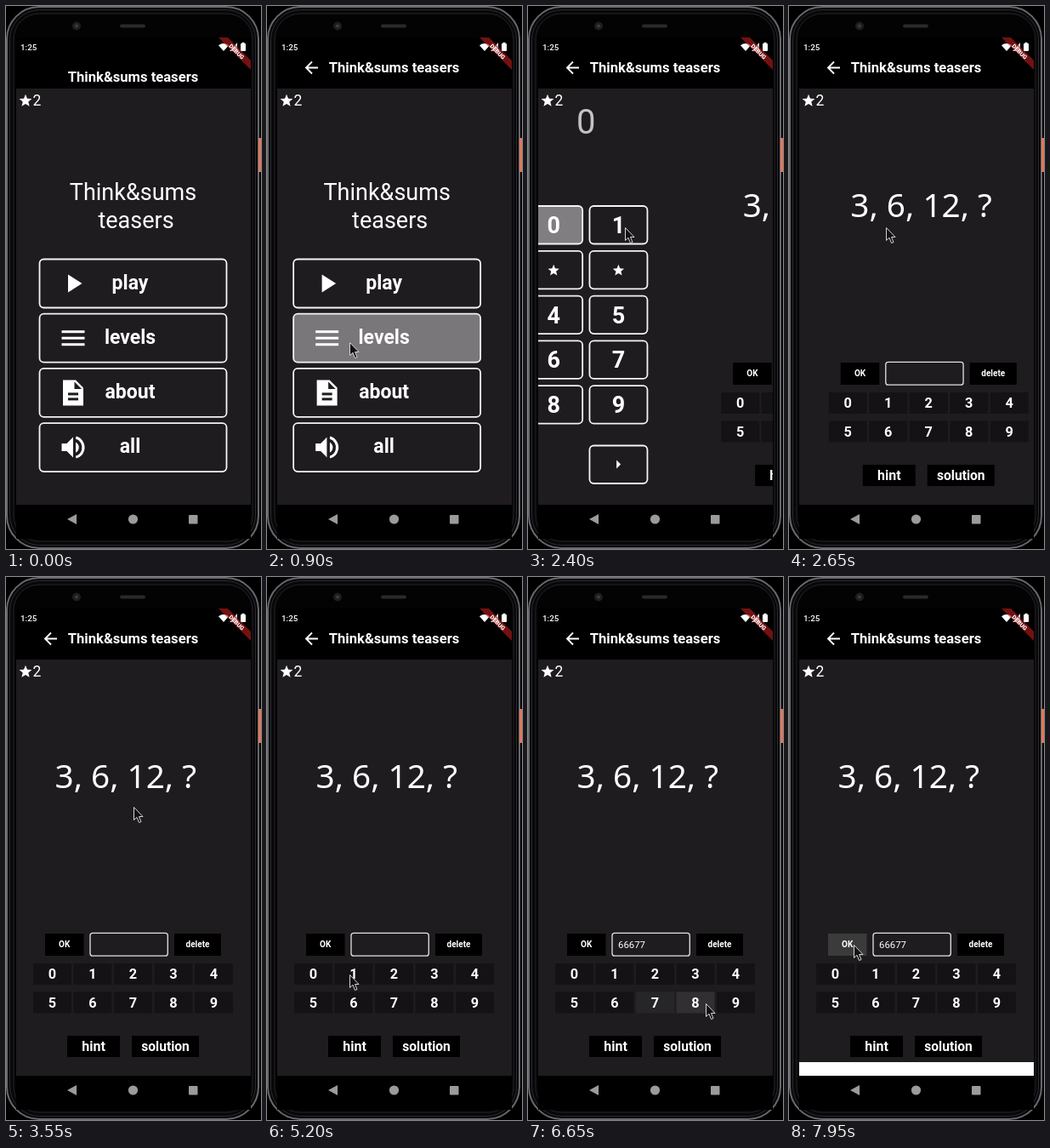
Recreate the animation shown at these times as an HTML page with a canvas. Size 300 by 638 pixels, loop 8000 ms.

```html
<!DOCTYPE html>
<html lang="en">
<head>
<meta charset="utf-8">
<title>Puzzle app</title>
<style>
html, body { margin: 0; height: 100%; overflow: hidden; background: #000; }
canvas { display: block; width: 100vw; height: 100vh; }
</style>
</head>
<body>
<canvas id="stage"></canvas>
<script>
const W = 300, H = 638, LOOP = 8000, STEP = 50, PAGE = 277;
const BG = '#1f1c1f', WHITE = '#fff', GRAY = '#9b9b9b';
const TYPED = '6667789', FIELD_SIZE = 5;
const canvas = document.getElementById('stage');
const dpr = window.devicePixelRatio || 1;
canvas.width = W * dpr;
canvas.height = H * dpr;
const c = canvas.getContext('2d');

// Timing
const clamp = v => Math.max(0, Math.min(1, v));
const ease = p => { p = clamp(p); return p * p * (3 - 2 * p); };
const pulse = (t, start, hold) =>
  t < start ? 0 : Math.min(1, 0.5 + (t - start) / 100) * (1 - clamp((t - start - hold) / 250));
const pressTime = i => 5600 + i * 190;

// Pointer stops: arrival time, travel time, place
const stop = (at, travel, x, y) => ({ at, travel, x, y });
const stops = [
  stop(50, 0, 239, 38), stop(280, 230, 30, 260), stop(450, 170, 97, 395),
  stop(2000, 750, 114, 260), stop(3550, 450, 150, 270), stop(3950, 400, 97, 467),
  stop(5400, 200, 97, 488), stop(6150, 200, 152, 495), stop(6650, 250, 209, 501),
  stop(6750, 100, 250, 502), stop(7450, 600, 76, 432)
];

// Drawing helpers
function text(s, x, y, size, weight = 700, align = 'center', color = WHITE, face = 'Roboto') {
  c.font = `${weight} ${size}px ${face}, sans-serif`;
  c.textAlign = align;
  c.fillStyle = color;
  c.fillText(s, x, y);
}
function rect(x, y, w, h, color = WHITE) {
  c.fillStyle = color;
  c.fillRect(x, y, w, h);
}
function round(x, y, w, h, r, fill, line = 0, color = WHITE) {
  c.beginPath();
  c.roundRect(x, y, w, h, r);
  if (fill) { c.fillStyle = fill; c.fill(); }
  if (line) { c.lineWidth = line; c.strokeStyle = color; c.stroke(); }
}
function poly(color, ...pts) {
  c.beginPath();
  for (let i = 0; i < pts.length; i += 2) c.lineTo(pts[i], pts[i + 1]);
  c.closePath();
  c.fillStyle = color;
  c.fill();
}
function disc(x, y, r, color, from = 0, to = 2 * Math.PI) {
  c.beginPath();
  c.arc(x, y, r, from, to);
  c.fillStyle = color;
  c.fill();
}
function star(x, y, r) {
  c.beginPath();
  for (let i = 0; i < 10; i++) {
    const a = i * Math.PI / 5, d = i % 2 ? r * 0.44 : r;
    c.lineTo(x + d * Math.sin(a), y - d * Math.cos(a));
  }
  c.fillStyle = WHITE;
  c.fill();
}
const triangle = (x, y, w, h, color = WHITE) => poly(color, x, y - h / 2, x + w, y, x, y + h / 2);
const veil = a => `rgba(255,255,255,${a})`;
const outlined = (x, y, w, h, glow = 0) => round(x, y, w, h, 5, veil(glow), 1.8, '#f4f4f4');

// Menu icons, drawn around their centre
const icons = {
  play() { triangle(-6, 0, 16.5, 21); },
  levels() { for (let y = -9; y <= 6; y += 7.5) rect(-13.5, y, 27, 3); },
  about() {
    poly(WHITE, -12, -15, 3, -15, 12, -6, 12, 15, -12, 15);
    poly(BG, 1.5, -13, 10, -4.5, 1.5, -4.5);
    rect(-6, 0, 12, 3, BG);
    rect(-6, 6, 12, 3, BG);
  },
  all() {
    poly(WHITE, -13.5, -4.5, -7.5, -4.5, 0, -12, 0, 12, -7.5, 4.5, -13.5, 4.5);
    disc(0, 0, 6.8, WHITE, -1.1, 1.1);
    c.beginPath();
    c.arc(0, 0, 12, -1.3, 1.3);
    c.lineWidth = 3;
    c.strokeStyle = WHITE;
    c.stroke();
    rect(0, -13, 3, 26, BG);
  }
};

function phone() {
  rect(0, 0, W, H, '#000');
  round(1, 1, 296, 636, 38, '#08070a', 2, '#68696d');
  round(4.5, 4.5, 289, 629, 35, '', 1, '#2b2b2f');
  round(9, 9, 281, 620, 30, '#030303', 1, '#242428');
  rect(297, 155, 3, 40, '#e0795c');
  disc(83, 23.5, 5, '#1d1e22');
  disc(83, 23.5, 2, '#3a3c42');
  round(134, 21.5, 30, 4, 2, '#2a2a2d');
}

function home(t) {
  text('Think&sums', 149.5, 228, 27, 400);
  text('teasers', 153, 260.5, 27, 400);
  Object.keys(icons).forEach((name, i) => {
    const y = 297.5 + i * 64.2;
    outlined(39.5, y, 220, 57, name === 'levels' ? 0.4 * pulse(t, 750, 200) : 0);
    c.save();
    c.translate(79, y + 28.5);
    icons[name]();
    c.restore();
    text(name, 146, y + 35, 23);
  });
}

function levels(t) {
  text('0', 150, 150, 40, 400, 'center', '#c4c2c4');
  for (let i = 0; i < 10; i++) {
    const x = 78 + (i % 2) * 76.3, y = 235 + (i >> 1) * 52.8;
    outlined(x, y, 68, 44.5, i ? 0 : 0.43 * pulse(t, 2200, 220));
    if (i === 2 || i === 3) star(x + 34, y + 23, 7);
    else text(i, x + 34, y + 32, 27);
  }
  outlined(154.3, 516.5, 68, 44.5);
  triangle(186, 538.5, 5, 10);
}

function button(label, x, y, w, h, size, glow = 0, color = '#000') {
  rect(x, y, w, h, color);
  rect(x, y, w, h, veil(glow));
  text(label, x + w / 2, y + h / 2 + size * 0.34, size);
}

function puzzle(t) {
  text('3, 6, 12, ?', 57.5, 248, 38.7, 500, 'left', WHITE, '"Noto Sans"');
  button('OK', 46, 419, 45.5, 26, 10, 0.23 * pulse(t, 7850, 400));
  button('delete', 198, 419, 55, 26, 10);
  round(99, 418.3, 91.3, 26.9, 3, '', 1.3, '#e4e4e4');
  const glow = {};
  [...TYPED].forEach((d, i) => { glow[d] = Math.max(glow[d] || 0, pulse(t, pressTime(i), 200)); });
  for (let i = 0; i < 10; i++)
    button(i, 32 + (i % 5) * 47.5, i < 5 ? 454 : 487.5, 45, 25, 16.3, 0.12 * (glow[i] || 0), '#141215');
  const count = clamp((Math.floor((t - pressTime(0)) / 190) + 1) / FIELD_SIZE) * FIELD_SIZE;
  text(TYPED.slice(0, count), 106, 435.7, 11.4, 400, 'left');
  button('hint', 72, 539, 62, 25, 16);
  button('solution', 148, 539, 79, 25, 15.6);
}

function statusBar() {
  text('1:25', 17, 52, 9.8, 500, 'left');
  disc(256, 52.5, 0.1, WHITE);
  c.beginPath();
  c.moveTo(256, 53);
  c.arc(256, 53, 9, -2.3, -0.84);
  c.fill();
  poly('#ddd', 263, 53, 272, 53, 272, 43);
  round(276, 44, 6, 9, 1, WHITE);
  rect(277.5, 42.8, 3, 2);
  poly('rgba(183,28,28,.63)', 250, 37, 261, 37, 288, 64, 288, 75);
  c.save();
  c.translate(271.3, 53.7);
  c.rotate(Math.PI / 4);
  text('DEBUG', 0, 2.4, 6.9, 900);
  c.restore();
}

function titleBar(inner) {
  rect(12, 37, 276, 60, '#000');
  statusBar();
  if (inner) {
    c.beginPath();
    c.moveTo(60, 72.5);
    c.lineTo(46, 72.5);
    c.moveTo(53, 65.5);
    c.lineTo(46, 72.5);
    c.lineTo(53, 79.5);
    c.lineWidth = 1.9;
    c.strokeStyle = WHITE;
    c.stroke();
  }
  text('Think&sums teasers', 149.5, inner ? 77.5 : 88.5, 16.6);
  star(23, 111.5, 7.8);
  text('2', 31.5, 117, 17.5, 400, 'left');
}

function nav() {
  rect(12, 586, 276, 40, '#000');
  triangle(83, 603, -11, 12, GRAY);
  disc(149.5, 603, 5.6, GRAY);
  round(215, 598, 10.5, 10.5, 1, GRAY);
}

function pointer(t) {
  if (t < stops[0].at) return;
  let { x, y } = stops[0];
  for (const s of stops.slice(1)) {
    const p = clamp((t - s.at + s.travel) / s.travel);
    x += (s.x - x) * p;
    y += (s.y - y) * p;
  }
  c.save();
  c.translate(x + 0.5, y + 0.5);
  poly('#111', 0, 0, 0, 15, 3.5, 11.8, 6, 18, 8.5, 17, 6, 11, 10.5, 11);
  c.lineWidth = 1;
  c.strokeStyle = '#d4d4d4';
  c.stroke();
  c.restore();
}

function draw(t) {
  c.setTransform(dpr, 0, 0, dpr, 0, 0);
  phone();
  c.save();
  c.beginPath();
  c.rect(12, 37, 276, 589);
  c.clip();
  rect(12, 97, 276, 489, BG);
  const scroll = ease((t - 848) / 500) + ease((t - 2220) / 500);
  [home, levels, puzzle].forEach((page, i) => {
    c.save();
    c.translate((i - scroll) * PAGE, 0);
    page(t);
    c.restore();
  });
  titleBar(t >= 850);
  const rise = 16 * clamp((t - 7850) / 100) ** 2;
  rect(12, 586 - rise, 276, rise);
  nav();
  c.restore();
  pointer(t);
}

const start = performance.now();
function tick() {
  const t = (performance.now() - start) % LOOP;
  draw(Math.floor(t / STEP) * STEP);
  requestAnimationFrame(tick);
}
tick();
</script>
</body>
</html>
```
